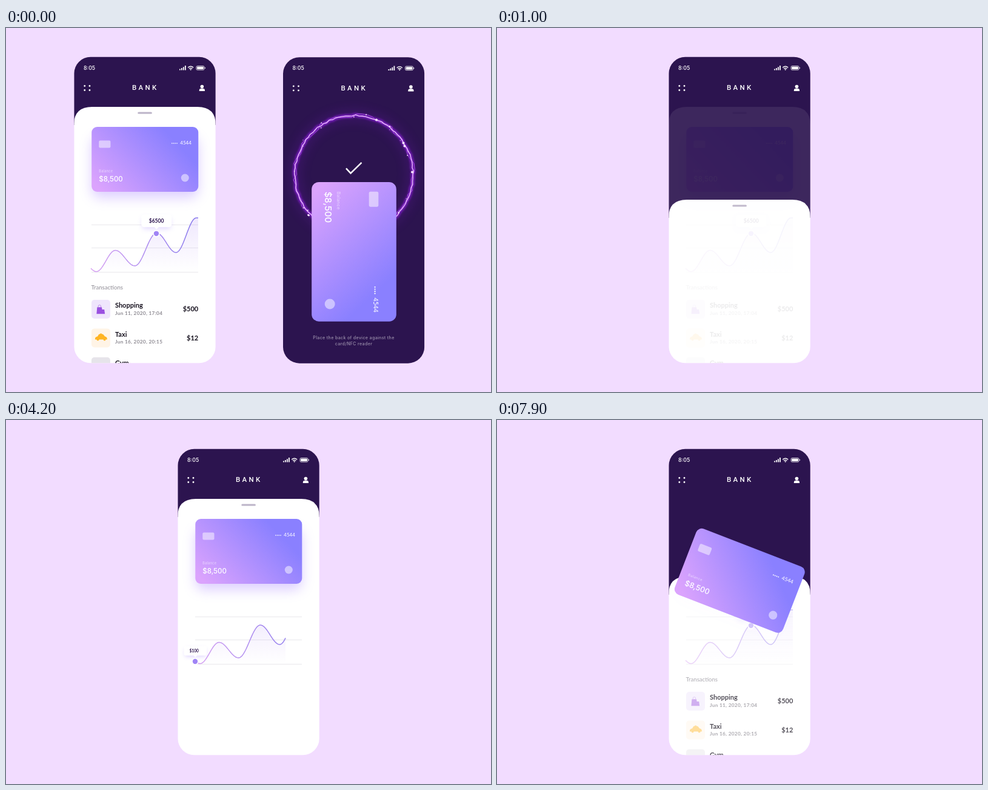
Write an HTML page that moves like this. It is 800 px wide and 600 px high and loops after 8 s.

```html
<!DOCTYPE html>
<html lang="en">
<head>
<meta charset="utf-8">
<title>Bank app</title>
<style>
html, body { margin: 0; width: 100%; height: 100%; overflow: hidden; background: #f2dcff; }
svg { display: block; width: 800px; height: 600px; position: absolute; left: 0; top: 0; }
text { font-family: Lato, sans-serif; }
.ui { font-family: Inter, sans-serif; font-weight: 500; }
.title { font: 500 11.5px Roboto, sans-serif; letter-spacing: 3.3px; }
.bold { font-weight: 700; font-size: 11px; fill: #17121f; }
.date { font-weight: 700; font-size: 8.2px; letter-spacing: .33px; fill: #8d8a92; }
</style>
</head>
<body>
<svg viewBox="0 0 800 600">
  <defs>
    <clipPath id="body"><rect x="283.5" y="47.8" width="233.2" height="504.4" rx="27"/></clipPath>
    <linearGradient id="cardFill" gradientUnits="userSpaceOnUse" x1="322" y1="263" x2="427" y2="163">
      <stop stop-color="#dba3fd"/><stop offset="1" stop-color="#8a80ff"/>
    </linearGradient>
    <linearGradient id="lineFill" gradientUnits="userSpaceOnUse" x1="312" y1="0" x2="488" y2="0">
      <stop stop-color="#d8a2f2"/><stop offset="1" stop-color="#8577ec"/>
    </linearGradient>
    <linearGradient id="areaFill" gradientUnits="userSpaceOnUse" x1="0" y1="313" x2="0" y2="402">
      <stop stop-color="#b08cf5" stop-opacity=".2"/><stop offset="1" stop-color="#b08cf5" stop-opacity="0"/>
    </linearGradient>
    <filter id="soft" x="-40%" y="-40%" width="180%" height="180%"><feGaussianBlur stdDeviation="10"/></filter>
    <filter id="small" x="-40%" y="-80%" width="180%" height="260%"><feGaussianBlur stdDeviation="4"/></filter>
    <filter id="glow" x="-20%" y="-20%" width="140%" height="140%"><feGaussianBlur stdDeviation="2"/></filter>
    <g id="header" fill="#fff">
      <text class="ui" x="299" y="69" font-size="8.8">8:05</text>
      <path d="M457 67.5h1.8v2h-1.8zM460 66h1.8v3.5h-1.8zM463 64.2h1.8v5.3h-1.8zM466 62h1.8v7.5h-1.8z"/>
      <g fill="none" stroke="#fff" stroke-width="1.3">
        <path d="M471.2 65.2q4.5-4 9 0M473 67.2q2.700-2.3 5.4 0"/>
        <rect x="485" y="62.6" width="13" height="6.6" rx="1.8" stroke-width=".8"/>
      </g>
      <circle cx="475.7" cy="68.6" r="1.1"/>
      <rect x="486.2" y="63.8" width="10.6" height="4.2" rx=".8"/>
      <rect x="498.8" y="64.8" width="1" height="2.2"/>
      <circle cx="300.8" cy="95.5" r="1.4"/><circle cx="309" cy="95.5" r="1.4"/>
      <circle cx="300.8" cy="102.5" r="1.4"/><circle cx="309" cy="102.5" r="1.4"/>
      <text class="title" x="379" y="102.2">BANK</text>
      <circle cx="494.4" cy="96.6" r="2.8"/>
      <path d="M489.8 104v-1.2q0-3 3-3h3.2q3 0 3 3v1.2z"/>
    </g>
    <g id="card">
      <rect x="312" y="163" width="176" height="107" rx="9" fill="url(#cardFill)"/>
      <rect x="324" y="185.6" width="19.2" height="12" rx="2" fill="#fff" opacity=".5"/>
      <path d="M444.6 190h.01m2.7 0h.01m2.7 0h.01m2.7 0h.01" stroke="#fff" stroke-width="1.7" stroke-linecap="round"/>
      <text x="458" y="192" font-size="8" fill="#fff">4544</text>
      <text class="ui" x="324" y="238" font-size="5.5" letter-spacing=".3" fill="#fff" opacity=".5">Balance</text>
      <text class="ui" x="324" y="253.4" font-size="11.5" fill="#fff">$8,500</text>
      <circle cx="466" cy="247" r="6.5" fill="#fff" opacity=".5"/>
    </g>
    <g id="bag">
      <path fill="#9a50e0" d="M321.4 460.3h7.6l.6 3.700h3.600l1 7.200h-13.800z"/>
      <path fill="none" stroke="#b98aea" stroke-width=".9" d="M323.200 460.500v-1.600a2.200 2.400 0 0 1 4.400 0v1.600"/>
    </g>
    <path id="taxi" fill="#ffb422" d="M318 512q0-3 4-3.6l2-3.2q.5-.8 1.6-.8h.6l.4-1h2l.4 1h.8q1 0 1.8.8l2.6 3.2q3.6.6 3.6 3.6v1.6h-2.2a2 2 0 0 1-4 0h-7a2 2 0 0 1-4 0H318z"/>
  </defs>
  <g id="stage"></g>
</svg>
<script>
const stage = document.getElementById('stage');
const LOOP = 8000, REST = 7400;
const span = (t, a, b) => Math.min(1, Math.max(0, (t - a) / (b - a)));
const smooth = p => p * p * (3 - 2 * p);
const out = (p, n) => 1 - (1 - p) ** n;
const group = (body, opacity = 1, transform = '') =>
  opacity > 0 ? `<g opacity="${Math.min(1, opacity)}" transform="${transform}">${body}</g>` : '';

// Chart: extremes joined by cosine slopes
const knots = [[302, 391], [320, 401.5], [351.5, 366.5], [383.5, 392], [419.5, 338], [451.5, 370], [485, 313], [490, 313]];
function curve(x) {
  const i = knots.findIndex(k => k[0] > x);
  const [x0, y0] = knots[i - 1], [x1, y1] = knots[i];
  return y0 + (y1 - y0) * (1 - Math.cos(Math.PI * (x - x0) / (x1 - x0))) / 2;
}

function chart(t) {
  const end = 311 + 177 * span(t, 3650, 4300);
  let line = `M311 ${curve(311)}`;
  for (let x = 312; x < end; x++) line += `L${x} ${curve(x)}`;
  line += `L${end} ${curve(end)}`;
  const grid = '<path d="M312 324.5H488M312 362.5H488M312 402.5H488" stroke="#e9e8ec" stroke-width="1"/>';
  return group(grid, span(t, 3500, 3900)) + (end > 311
    ? `<path d="${line}V402H311z" fill="url(#areaFill)"/>
       <path d="${line}" fill="none" stroke="url(#lineFill)" stroke-width="1.5"/>` : '');
}

function tip(t) {
  const size = out(span(t, 3900, 4600), 2.5);
  if (!size) return '';
  const p = smooth(span(t, 4700, 6780));
  const x = 312 + 107 * p, y = curve(x) + .8;
  const bubble = `<rect x="-23" y="-5" width="46" height="18" rx="4" fill="#a88aff" opacity=".35" filter="url(#small)"/>
    <path d="M-4 10L0 14L4 10z" fill="#fff"/><rect x="-25" y="-10.5" width="50" height="21" rx="4.5" fill="#fff"/>
    <text x="-12.6" y="3.1" font-size="8.6" font-weight="700" fill="#2c144f">$${Math.round(100 + 6400 * p)}</text>`;
  return group(bubble, 1, `translate(${x + .3} ${y - 21 + (1 - size) * 14}) scale(${size})`)
    + `<circle cx="${x}" cy="${y}" r="${5 * Math.min(1, size * 1.4)}" fill="#a084f5" stroke="#fff" stroke-width="1.6"/>`;
}

const items = [
  ['Shopping', 'Jun 11, 2020, 17:04', '$500', '#efe5fc', '<use href="#bag"/>'],
  ['Taxi', 'Jun 16, 2020, 20:15', '$12', '#fff4e6', '<use href="#taxi" y="-47.4"/>'],
  ['Gym', '', '', '#e6e4ea', '']
];

function transactions(t, textFade, iconFade) {
  const title = '<text x="311.5" y="431" font-size="9.6" fill="#8f8c95">Transactions</text>';
  const rows = items.map(([name, date, sum, tint, icon], i) => {
    const tile = `<rect x="312" y="448" width="31" height="31" rx="5" fill="${tint}"/>${icon}`;
    const label = `<text class="bold" x="351" y="461.3">${name}</text>
      <text class="date" x="351" y="472.8">${date}</text>
      <text class="bold" x="488.3" y="467.4" text-anchor="end">${sum}</text>`;
    return group(group(tile, iconFade) + group(label, textFade), 1, `translate(0 ${47.4 * i})`);
  });
  return [group(title, textFade), ...rows].map((part, i) => {
    const a = out(span(t, 4500 + 200 * i, 5300 + 200 * i), 3);
    return group(part, a, `translate(0 ${20 * (1 - a)})`);
  }).join('');
}

function card(t, leave) {
  const e = smooth(span(t, 1800, 3500));
  if (!e) return '';
  const shadow = `<rect x="312" y="180" width="176" height="100" rx="14" fill="#a27cff" opacity=".36" filter="url(#soft)"/>`;
  const entry = `matrix(${e} ${-.622 * e * (1 - e)} ${.093 * e * (1 - e)} ${e ** 1.5} 0 0)`;
  const turn = `translate(400.3 ${216.5 + 152.2 * leave ** .96}) rotate(${90 * leave ** 1.21}) scale(${1 + .29 * leave})`;
  return group(group(shadow, 1 - 3.2 * leave) + '<use href="#card"/>', 1, `${turn} ${entry} translate(-400 -216.5)`);
}

function phone(t) {
  const rise = out(span(t, 700, 1600) ** 1.2, 3.25);
  const leave = span(t, 7450, 8270) ** 2;
  const top = 130 + 423 * (1 - rise + leave);
  const iconFade = 1 - 1.8 * leave;
  return `<g clip-path="url(#body)">
    <rect x="283" y="47" width="234" height="${top - 17}" fill="#2c144f"/><use href="#header"/>
    <path d="M283 ${top + 30}q0-30 30-30H487q30 0 30 30V1100H283z" fill="#fff"/>
    <rect x="388.3" y="${top + 8.5}" width="23.6" height="3" rx="1.5" fill="#bcb4c8"/>
    ${group(chart(t) + tip(t), iconFade)}${transactions(t, 1 - .9 * leave, iconFade)}${card(t, leave)}</g>`;
}

// Crackling ring of light, reshuffled ten times a second
function ring(t) {
  let seed = 7 + Math.floor(t / 100);
  const rnd = () => (seed = (seed * 16807 + 11) % 2147483647) / 2147483647;
  for (let i = 0; i < 5; i++) rnd();
  const loop = (n, spread) => {
    let d = '';
    for (let i = 0; i < n; i++) {
      const a = i / n * 2 * Math.PI, r = 97.5 + (rnd() - .5) * spread;
      d += `${i ? 'L' : 'M'}${(400.5 + r * Math.cos(a)).toFixed(1)} ${(241 + r * Math.sin(a)).toFixed(1)}`;
    }
    return d + 'z';
  };
  const stroke = (d, color, width, extra = '') =>
    `<path d="${d}" fill="none" stroke="${color}" stroke-width="${width}" ${extra}/>`;
  const main = loop(110, 2);
  let sparks = '';
  for (let i = 0; i < 26; i++) {
    const a = rnd() * 6.283, r = 97.5 + (rnd() - .5) * 8;
    sparks += `<circle cx="${400.5 + r * Math.cos(a)}" cy="${241 + r * Math.sin(a)}" r="${.5 + rnd()}"/>`;
  }
  const nodes = [[437.5, 151], [482, 189], [484, 194], [496.5, 237]]
    .map(([x, y]) => `<circle cx="${x}" cy="${y}" r="2"/>`).join('');
  return stroke(main, '#8a1fe0', 12, 'opacity=".25" filter="url(#soft)"')
    + stroke(main, '#a428ff', 4.5, 'opacity=".85" filter="url(#glow)"')
    + stroke(loop(70, 7), '#c560ff', .7) + stroke(main, '#f0c4ff', 1.3)
    + `<g fill="#f8e2ff">${sparks}${nodes}</g>`;
}

function reader(t) {
  const hint = (y, s) => `<text class="ui" x="400" y="${y}" font-size="7.1" letter-spacing=".33" text-anchor="middle" fill="#fff" opacity=".52">${s}</text>`;
  return `<g clip-path="url(#body)"><rect x="283" y="47" width="234" height="506" fill="#2c144f"/>
    <use href="#header"/>${ring(t)}
    <path d="M387.5 231l7.5 8L413 221.5" fill="none" stroke="#fff" stroke-width="2.4"/>
    <use href="#card" transform="translate(400.5 368.4) rotate(90) scale(1.305) translate(-400 -216.5)"/>
    ${hint(513, 'Place the back of device against the')}${hint(523, 'card/NFC reader')}</g>`;
}

const resting = phone(REST);

function draw() {
  const t = performance.now() % LOOP;
  const slide = out(span(t, 0, 900) ** 1.3, 6);
  let view = '';
  if (t < 590) view += group(reader(t), 1 - t / 590, `translate(173.5 ${.4 + 49.5 * slide})`);
  if (t >= 600) view += phone(t);
  if (t < 1035) view += group(resting, 1 - span(t, 600, 1035), `translate(${-171.2 * (1 - slide)} 0)`);
  stage.innerHTML = view;
  requestAnimationFrame(draw);
}
draw();
</script>
</body>
</html>
```
